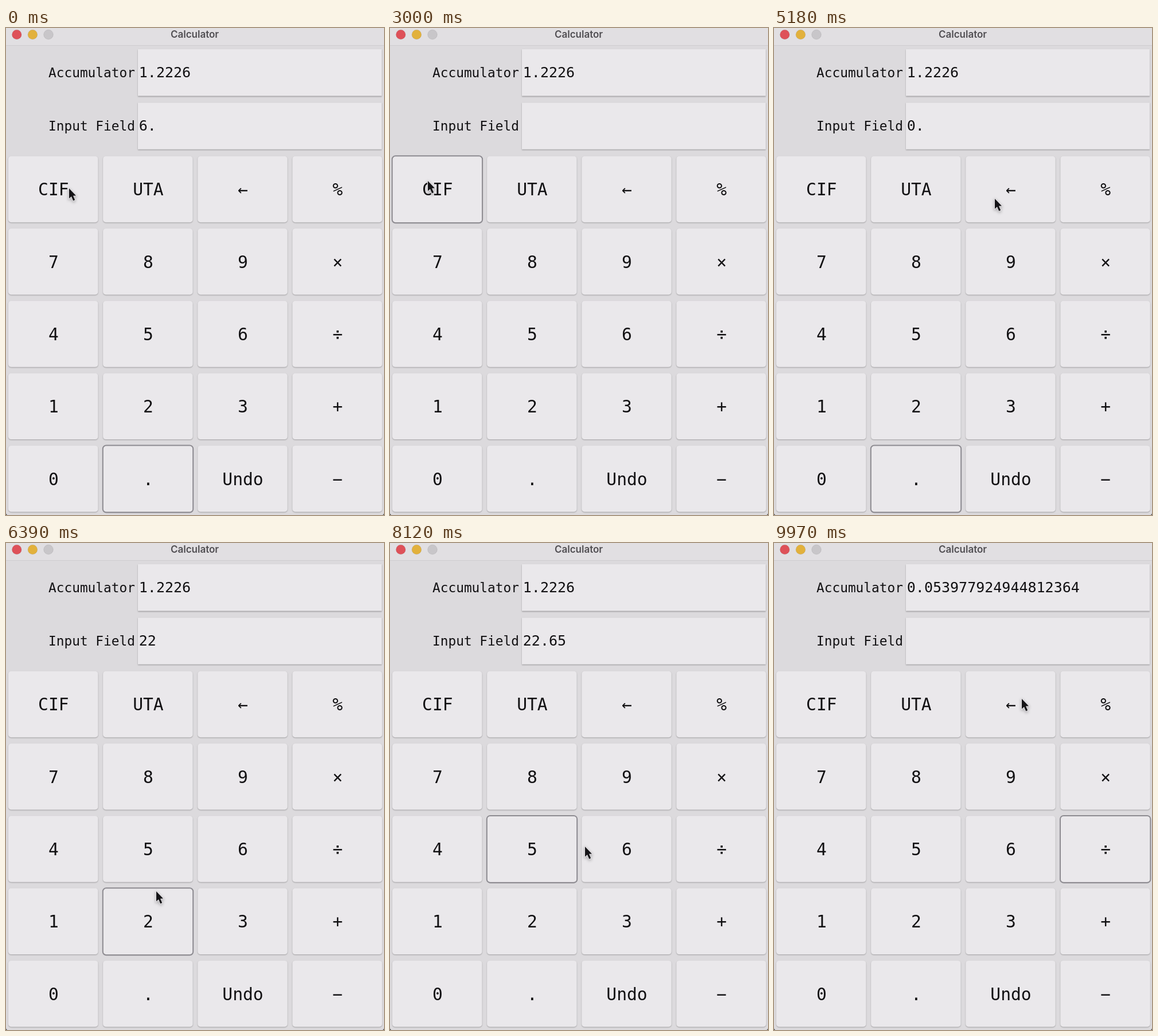
These frames come from a looping animation (659 px wide and 850 px high, 10000 ms). An HTML page with a canvas:

```html
<!DOCTYPE html>
<html lang="en">
<head>
<meta charset="utf-8">
<title>Calculator</title>
<style>
  html, body { margin: 0; width: 100%; height: 100%; overflow: hidden; background: #dcdadd; }
  canvas { display: block; }
</style>
</head>
<body>
<canvas id="stage" width="659" height="850"></canvas>
<script>
const ctx = document.getElementById('stage').getContext('2d');
const LOOP = 10000;
const MONO = '"DejaVu Sans Mono", monospace';
const KEYS = ['CIF', 'UTA', '←', '%', ...'789×456÷123+0.', 'Undo', '−'];

// Clicks: time and key
const clicks = [
  [300, 'CIF'], [1060, '.'], [1520, '2'], [1910, '6'], [2900, 'CIF'], [3790, '.'],
  [5280, '←'], [5420, '←'], [6120, '2'], [6240, '2'], [7240, '.'], [7640, '6'],
  [7970, '5'], [9760, '÷']
];

// Pointer moves: start time, end time, x and y of the tip on arrival
const moves = [
  [320, 610, 254, 815], [780, 850, 253, 795], [1080, 1360, 258, 648],
  [1540, 1640, 277, 602], [1700, 1760, 355, 545], [2240, 2600, 250, 792],
  [2640, 3000, 66, 267], [3060, 3240, 82, 270], [3480, 3760, 253, 795],
  [4030, 4480, 80, 264], [4730, 5000, 525, 300], [5000, 5180, 385, 298],
  [5210, 5300, 398, 290], [5430, 5730, 211, 640], [6120, 6240, 262, 608],
  [6420, 6640, 370, 477], [6640, 7060, 248, 800], [7260, 7480, 397, 532],
  [7660, 7790, 315, 531], [8090, 8120, 340, 530], [8150, 8270, 640, 668],
  [8550, 9210, 590, 540], [9780, 9970, 432, 272]
];

function pointerAt(t) {
  let x = 110, y = 280;
  for (const [from, to, nextX, nextY] of moves) {
    if (t < from) break;
    const u = Math.min(1, (t - from) / (to - from)), ease = u * u * (3 - 2 * u);
    x += (nextX - x) * ease;
    y += (nextY - y) * ease;
  }
  return [x, y];
}

function press(state, key) {
  let { accumulator, input } = state;
  if (key === 'CIF') input = '';
  else if (key === '←') input = input.slice(0, -1);
  else if (key === '÷') {
    accumulator = String(accumulator / input);
    input = '';
  } else input += key === '.' && !input ? '0.' : key;
  return { accumulator, input, focus: key };
}

function stateAt(t) {
  return clicks.filter(([time]) => time <= t).reduce((state, [, key]) => press(state, key),
    { accumulator: '1.2226', input: '6.', focus: '.' });
}

function text(str, x, y, font, align = 'left', color = '#111012') {
  ctx.font = font;
  ctx.textAlign = align;
  ctx.fillStyle = color;
  ctx.fillText(str, x, y);
}

function box(x, y, w, h, r, color) {
  ctx.beginPath();
  ctx.roundRect(x, y, w, h, r);
  ctx.fillStyle = color;
  ctx.fill();
}

function raised(x, y, w, h, r) {
  ctx.save();
  ctx.shadowColor = 'rgba(0,0,0,.28)';
  ctx.shadowBlur = 2;
  ctx.shadowOffsetY = 1;
  box(x, y, w, h, r, '#eae8eb');
  ctx.restore();
}

function drawTitleBar() {
  box(0, 0, 659, 30, 0, '#e1dfe2');
  box(0, 30, 659, 1, 0, '#cfcdd0');
  ['#de5159', '#e2b13c', '#c8c6c9'].forEach((color, i) => {
    ctx.beginPath();
    ctx.arc(18.8 + 27.6 * i, 11.5, 8.3, 0, 7);
    ctx.fillStyle = color;
    ctx.fill();
    ctx.strokeStyle = 'rgba(0,0,0,.08)';
    ctx.lineWidth = 1;
    ctx.stroke();
  });
  text('Calculator', 329, 17, '600 17px Inter, sans-serif', 'center', '#504e52');
}

function drawField(label, value, y) {
  raised(230, y, 425, 81.5, 0);
  text(label, 74, y + 49, '22.8px ' + MONO);
  text(value, 231.8, y + 49, '25px ' + MONO);
}

function drawKey(label, i, focused) {
  const x = 4 + i % 4 * 165.1, y = 223.7 + Math.floor(i / 4) * 126.3;
  raised(x, y, 156.5, 115.5, 5);
  if (focused) {
    ctx.beginPath();
    ctx.roundRect(x - .3, y - .4, 157.4, 117, 6);
    ctx.strokeStyle = '#8d8b91';
    ctx.lineWidth = 2;
    ctx.stroke();
  }
  text(label, x + 78.8, y + 68.7, '29.6px ' + MONO, 'center');
}

const arrow = new Path2D('M0 0V17.5L4 14 7.2 21.5 10.2 20 7 12.8 12 12.5Z');

function drawPointer(x, y) {
  ctx.save();
  ctx.translate(x, y);
  ctx.shadowColor = 'rgba(0,0,0,.35)';
  ctx.shadowBlur = 5;
  ctx.shadowOffsetY = 2;
  ctx.strokeStyle = '#e4e2e5';
  ctx.lineWidth = 2;
  ctx.stroke(arrow);
  ctx.shadowColor = 'transparent';
  ctx.fillStyle = '#151417';
  ctx.fill(arrow);
  ctx.restore();
}

const corners = new Path2D('M0 846Q0 850 3 850H0ZM659 846Q659 850 656 850H659Z');

function draw(t) {
  const { accumulator, input, focus } = stateAt(t);
  box(0, 0, 659, 850, 0, '#dcdadd');
  drawTitleBar();
  drawField('Accumulator', accumulator, 37);
  drawField('Input Field', input, 130.3);
  KEYS.forEach((key, i) => drawKey(key, i, key === focus));
  ctx.fillStyle = '#29282b';
  ctx.fill(corners);
  drawPointer(...pointerAt(t));
}

const start = performance.now();
function tick() {
  draw((performance.now() - start) % LOOP);
  requestAnimationFrame(tick);
}
tick();
</script>
</body>
</html>
```
